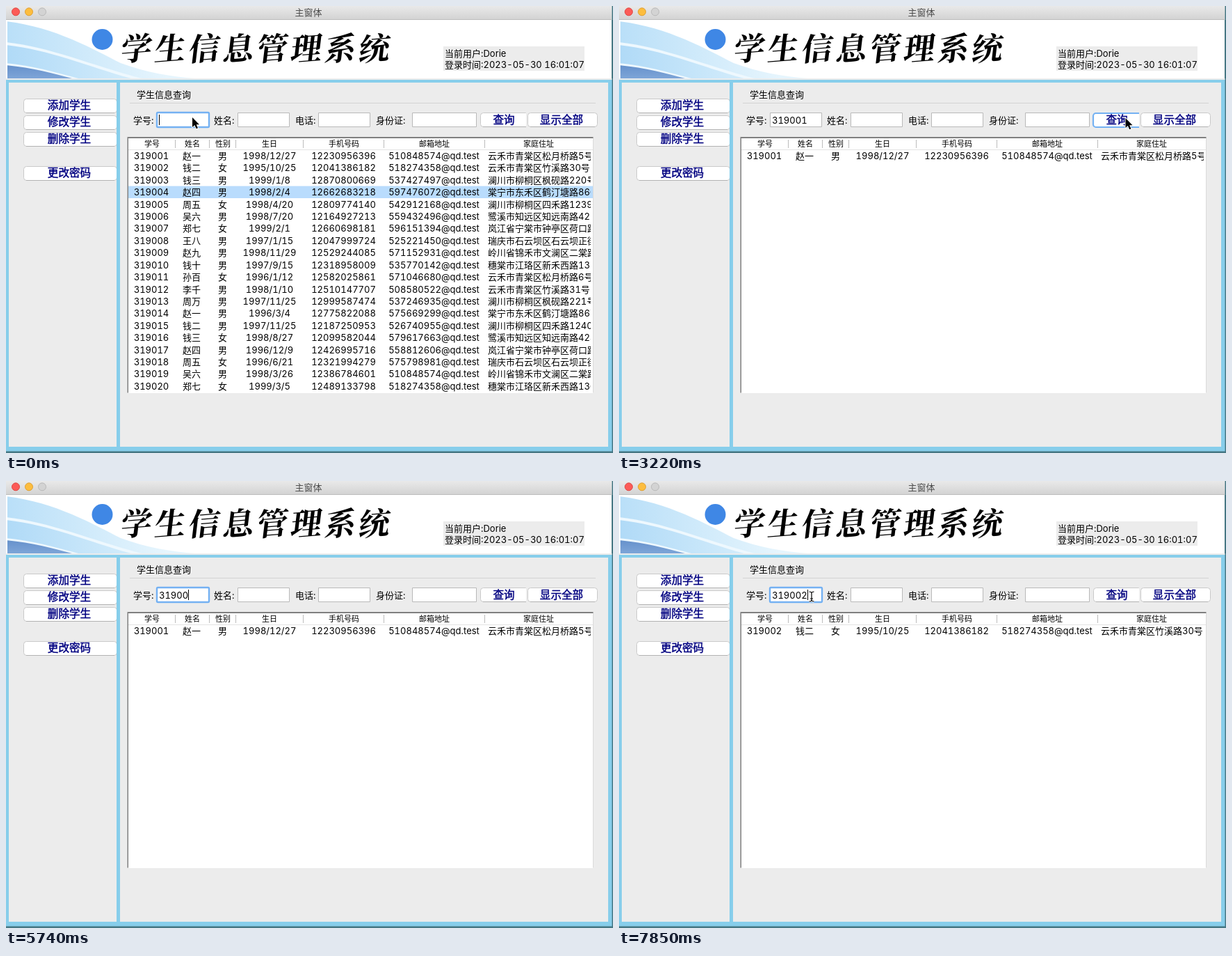
Animation, 873 px wide and 642 px high, one loop 8 s. Source, as an HTML page with a canvas:

```html
<!DOCTYPE html>
<html lang="zh-CN">
<head>
<meta charset="utf-8">
<title>主窗体</title>
<style>
html, body { margin: 0; width: 873px; height: 642px; overflow: hidden; background: #ececec; }
canvas, #text { position: absolute; left: 0; top: 0; width: 873px; height: 642px; overflow: hidden; }
#text { font: 13px Inter, "Noto Sans CJK SC", "Noto Sans CJK", sans-serif; font-feature-settings: "tnum"; }
#text div { position: absolute; white-space: pre; line-height: 20px; color: #000; }
#text .mid { width: 140px; text-align: center; }
#text .btn { color: #000080; -webkit-text-stroke: .45px #000080; }
#text .addr { width: 148px; overflow: hidden; }
</style>
</head>
<body>
<canvas id="back" width="873" height="642"></canvas>
<div id="text"></div>
<canvas id="front" width="873" height="642"></canvas>
<script>
const LOOP = 8000;
const g = document.getElementById('back').getContext('2d');
const top2d = document.getElementById('front').getContext('2d');
const layer = document.getElementById('text');

const INPUTS = [[217, 75], [333, 75], [449, 75], [584, 93]];
const SIDE = [['添加学生', 143], ['修改学生', 167], ['删除学生', 191], ['更改密码', 240]];
const COLS = [210, 268, 312, 379, 486, 616, 766];
const HEADS = ['学号', '姓名', '性别', '生日', '手机号码', '邮箱地址', '家庭住址'];
const ROW_Y = 214.9, ROW_H = 17.42;

// ---------- text ----------
function label(s, x, y, cls = '', size = 13, parent = layer) {
  const d = document.createElement('div');
  const mid = cls.includes('mid');
  d.className = cls;
  d.textContent = s;
  d.style.left = (mid ? x - 70 : x) + 'px';
  d.style.top = (y - 10) + 'px';
  d.style.fontSize = size + 'px';
  parent.appendChild(d);
  return d;
}

let seed = 20230;
function digits(n) {
  let s = '';
  while (s.length < n) {
    seed = (seed * 16807) % 2147483647;
    s += Math.floor(seed / 2147483647 * 10);
  }
  return s;
}

const NAMES = '赵一 钱二 钱三 赵四 周五 吴六 郑七 王八 赵九 钱十 孙百 李千 周万'.split(' ');
const SEX = '男女男男女男女男男男女男男男男女男女男女';
const BIRTH = ('1998/12/27 1995/10/25 1999/1/8 1998/2/4 1998/4/20 1998/7/20 1999/2/1 ' +
  '1997/1/15 1998/11/29 1997/9/15 1996/1/12 1998/1/10 1997/11/25 1996/3/4 ' +
  '1997/11/25 1998/8/27 1996/12/9 1996/6/21 1998/3/26 1999/3/5').split(' ');
const STREETS = [
  ['云禾市青棠区松月桥路', 5], ['云禾市青棠区竹溪路', 30], ['澜川市柳桐区枫砚路', 220],
  ['棠宁市东禾区鹤汀塘路', 866], ['澜川市柳桐区四禾路', 1239], ['鹭溪市知远区知远南路', 422],
  ['岚江省宁棠市钟亭区荷口路', 22], ['瑞庆市石云坝区石云坝正街', 174],
  ['岭川省锦禾市文澜区二棠路', 24], ['穗棠市江珞区新禾西路', 135]];

const mails = Array.from({ length: 18 }, () => '5' + digits(8) + '@qd.test');
const rows = BIRTH.map((birth, i) => {
  const row = document.createElement('div');
  row.style.left = '0px';
  row.style.top = '0px';
  layer.appendChild(row);
  const y = ROW_Y + ROW_H * i;
  const put = (s, x, cls) => label(s, x, y, cls, 13, row);
  put(String(319001 + i), 209, 'mid');
  put(NAMES[i % 13], 267, 'mid');
  put(SEX[i], 311.5, 'mid');
  put(birth, 379, 'mid');
  put('12' + digits(9), 485.5, 'mid');
  put(mails[i % 18], 615.5, 'mid');
  const [street, no] = STREETS[i % 10];
  put(street + (no + (i > 9 ? 1 : 0)) + '号', 693, 'addr');
  return row;
});

label('主窗体', 435, 9, 'mid').style.color = '#4a4a4a';
label('当前用户:Dorie', 631, 68);
label('登录时间:2023-05-30 16:01:07', 631, 84);
label('学生信息查询', 188, 127);
[['学号:', 183], ['姓名:', 299], ['电话:', 416], ['身份证:', 532]].forEach(([s, x]) => label(s, x, 164));
SIDE.forEach(([s, y]) => label(s, 91, y, 'mid btn', 15.6));
label('查询', 716, 164, 'mid btn', 15.6);
label('显示全部', 799, 164, 'mid btn', 15.6);
HEADS.forEach((s, i) => label(s, COLS[i], 198, 'mid', 11));
const field = label('', 220, 164);

// ---------- shapes ----------
function box(x, y, w, h, fill) {
  g.fillStyle = fill;
  g.fillRect(x, y, w, h);
}

function grad(x0, y0, x1, y1, a, b) {
  const k = g.createLinearGradient(x0, y0, x1, y1);
  k.addColorStop(0, a);
  k.addColorStop(1, b);
  return k;
}
const vgrad = (y0, y1, a, b) => grad(0, y0, 0, y1, a, b);

function round(x, y, w, h, r, fill, stroke, lw = 1) {
  g.beginPath();
  g.roundRect(x, y, w, h, r);
  g.fillStyle = fill;
  g.fill();
  if (stroke) {
    g.strokeStyle = stroke;
    g.lineWidth = lw;
    g.stroke();
  }
}

function disc(x, y, r, fill, edge) {
  g.beginPath();
  g.arc(x, y, r, 0, 7);
  g.fillStyle = fill;
  g.fill();
  if (edge) {
    g.strokeStyle = edge;
    g.lineWidth = 1;
    g.stroke();
  }
}

function shape(path, fill) {
  g.fillStyle = fill;
  g.fill(new Path2D(path));
}

function button(x, y, w) {
  round(x + .5, y + .5, w - 1, 20, 4, '#fff', '#c9c9c9');
  box(x + 4, y + 20, w - 8, 1, '#b2b2b2');
}

function banner() {
  box(0, 20, 871, 84, '#fff');
  g.save();
  g.beginPath();
  g.rect(2, 21, 300, 83);
  g.clip();
  shape('M0 22C70 30 125 62 165 82C200 95 240 102 272 104L0 104Z', grad(0, 0, 230, 0, '#b9dff8', '#e6f5fd'));
  shape('M0 52C60 58 120 84 195 104L0 104Z', '#eef8fe');
  shape('M0 56C60 62 115 86 180 104L0 104Z', grad(0, 0, 180, 0, '#b0daf7', '#d3ecfb'));
  shape('M0 82C35 85 72 95 104 104L0 104Z', '#eef8fe');
  shape('M0 85C35 88 70 97 95 104L0 104Z', vgrad(84, 105, '#6590cb', '#7fa6d8'));
  g.restore();
  disc(138.5, 48, 15, '#3f87e5');

  g.fillStyle = '#000';
  g.textAlign = 'center';
  g.textBaseline = 'alphabetic';
  g.font = 'bold 45px "Noto Serif CJK SC", "Noto Sans CJK SC", "Noto Sans CJK", serif';
  [...'学生信息管理系统'].forEach((c, i) => {
    g.save();
    g.translate(188 + 48.9 * i, 60.5);
    g.transform(1, -.08, -.12, 1, 0, 0);
    g.fillText(c, 0, 17);
    g.restore();
  });
  box(629, 58, 203, 35, '#ececec');
}

function drawBack(s) {
  box(0, 0, 873, 642, '#467784');
  box(0, 0, 871.5, 20, vgrad(0, 20, '#e9e9e9', '#d2d2d2'));
  box(0, 19, 871.5, 1, '#bdbdbd');
  disc(14, 8.3, 5.5, '#fc5b57', '#df4744');
  disc(33, 8.3, 5.5, '#fdbd3e', '#dea034');
  disc(52, 8.3, 5.5, '#d3d3d3', '#b9b9b9');
  banner();

  box(0, 104, 871.5, 2, '#ececec');
  box(0, 106, 871.5, 533.5, '#87ceeb');
  box(4, 110, 155, 523, '#ececec');
  box(164, 110, 702, 523, '#ececec');
  g.save();
  g.beginPath();
  g.rect(4, 110, 155, 523);
  g.clip();
  SIDE.forEach(([, y]) => button(25, y - 10, 135));
  g.restore();

  box(178, 139, 670, 1, '#d3d3d3');
  INPUTS.forEach(([x, w], i) => {
    if (i === 0 && s.focus === 'field') round(x, 153, w, 21, 1.5, '#fff', '#74b1f2', 2.4);
    else round(x + .5, 153.5, w - 1, 20, 0, '#fff', '#b9b9b9');
  });

  g.save();
  g.beginPath();
  g.rect(678, 148, 70, 32);
  g.clip();
  if (s.pressed) round(681, 153, 72, 21.5, 4, vgrad(153, 175, '#4f9ef6', '#0b63e4'), '#3f8ae8');
  else {
    button(682, 153, 70);
    if (s.focus === 'button') round(682, 154, 70, 20, 4, '#fff', '#74b1f2', 2.2);
  }
  g.restore();
  button(750, 153, 101);

  box(174.5, 188, 670, 367.5, '#808080');
  box(176, 190, 668.5, 366, '#fff');
  box(176, 206, 668, 1, '#e3e3e3');
  [243, 292, 330, 427, 543, 688].forEach(x => box(x, 192, 1, 12, '#bcbcbc'));
  if (s.shown < 0) box(176, 258.6, 668, 17.4, '#b9dcfd');
}

// ---------- pointer ----------
function arrow(x, y) {
  const c = top2d;
  c.save();
  c.translate(x, y);
  const p = new Path2D('M0 0V14L3.3 11L5.7 16.3L8 15.3L5.7 10.2H10Z');
  c.lineJoin = 'round';
  c.strokeStyle = '#fff';
  c.lineWidth = 1.8;
  c.stroke(p);
  c.fillStyle = '#000';
  c.fill(p);
  c.restore();
}

function beam(x, y) {
  const c = top2d;
  c.save();
  c.translate(x, y);
  const p = new Path2D('M-3.5 -7Q0 -7 0 -4.5Q0 -7 3.5 -7M0 -5V5M-3.5 7Q0 7 0 4.5Q0 7 3.5 7M-2 3H2');
  [['#fff', 2.8], ['#000', 1.2]].forEach(([col, w]) => {
    c.strokeStyle = col;
    c.lineWidth = w;
    c.stroke(p);
  });
  c.restore();
}

// start, tick, ticks, from, bend, to, easing
const smooth = u => u * u * (3 - 2 * u);
const settle = u => 1 - (1 - u) ** 3;
const MOVES = [
  [2440, 60, 11, [268, 160], [498, 84], [728.5, 161], smooth],
  [3690, 57, 14, [728.5, 161], [505, 203], [281, 165], smooth],
  [5270, 60, 6, [281, 165], [390, 70], [476, 5], smooth],
  [6100, 58, 7, [476, 5], [606, 93], [737, 180.5], settle],
  [6510, 57, 3, [737, 180.5], [734, 172], [728, 163], smooth],
  [6860, 58, 13, [728, 163], [500, 237], [277, 166], smooth]];

function pointer(t) {
  let pos = MOVES[0][3];
  for (const [start, tick, n, a, b, c, ease] of MOVES) {
    if (t < start) break;
    const u = ease(Math.min(1, (Math.floor((t - start) / tick) + 1) / n));
    pos = a.map((v, i) => (1 - u) ** 2 * v + 2 * u * (1 - u) * b[i] + u * u * c[i]);
  }
  return pos;
}

// ---------- timeline ----------
const at = (list, t) => list.filter(e => e[0] <= t).pop()[1];
const TYPED = [[0, ''], [530, '3'], [710, '31'], [950, '319'], [1190, '3190'], [1360, '31900'],
  [1600, '319001'], [5740, '31900'], [6040, '319002']];
const CARET = [[0, 1], [50, 0], [350, 1], [1840, 0], [2140, 1], [2740, 0], [4670, 1],
  [5270, 0], [5570, 1], [6640, 0], [7670, 1]];
const FOCUS = [[0, 'field'], [3100, 'button'], [4670, 'field'], [6680, 'button'], [7670, 'field']];
const SHOWN = [[0, -1], [3220, 0], [6800, 1]];

let last = '';
function update(t) {
  const s = {
    focus: at(FOCUS, t),
    shown: at(SHOWN, t),
    pressed: (t >= 3100 && t < 3220) || (t >= 6680 && t < 6800)
  };
  const key = JSON.stringify(s);
  if (key !== last) {
    last = key;
    drawBack(s);
    rows.forEach((r, i) => {
      r.style.display = s.shown < 0 || s.shown === i ? '' : 'none';
      r.style.top = (s.shown > 0 ? -ROW_H * s.shown : 0) + 'px';
    });
  }
  const typed = at(TYPED, t);
  if (field.textContent !== typed) field.textContent = typed;

  top2d.clearRect(0, 0, 873, 642);
  if (s.focus === 'field' && at(CARET, t)) {
    top2d.fillStyle = '#000';
    top2d.fillRect(Math.round(220 + typed.length * 8.45), 156, 1, 15);
  }
  if (t >= 5740 && t < 6100) return; // hidden while typing
  const [x, y] = pointer(t);
  const over = y > 153 && y < 174 && INPUTS.some(([l, w]) => x > l && x < l + w);
  (over && t >= 3690 ? beam : arrow)(x, y);
}

const t0 = performance.now();
function loop() {
  update((performance.now() - t0) % LOOP);
  requestAnimationFrame(loop);
}
loop();
</script>
</body>
</html>
```
